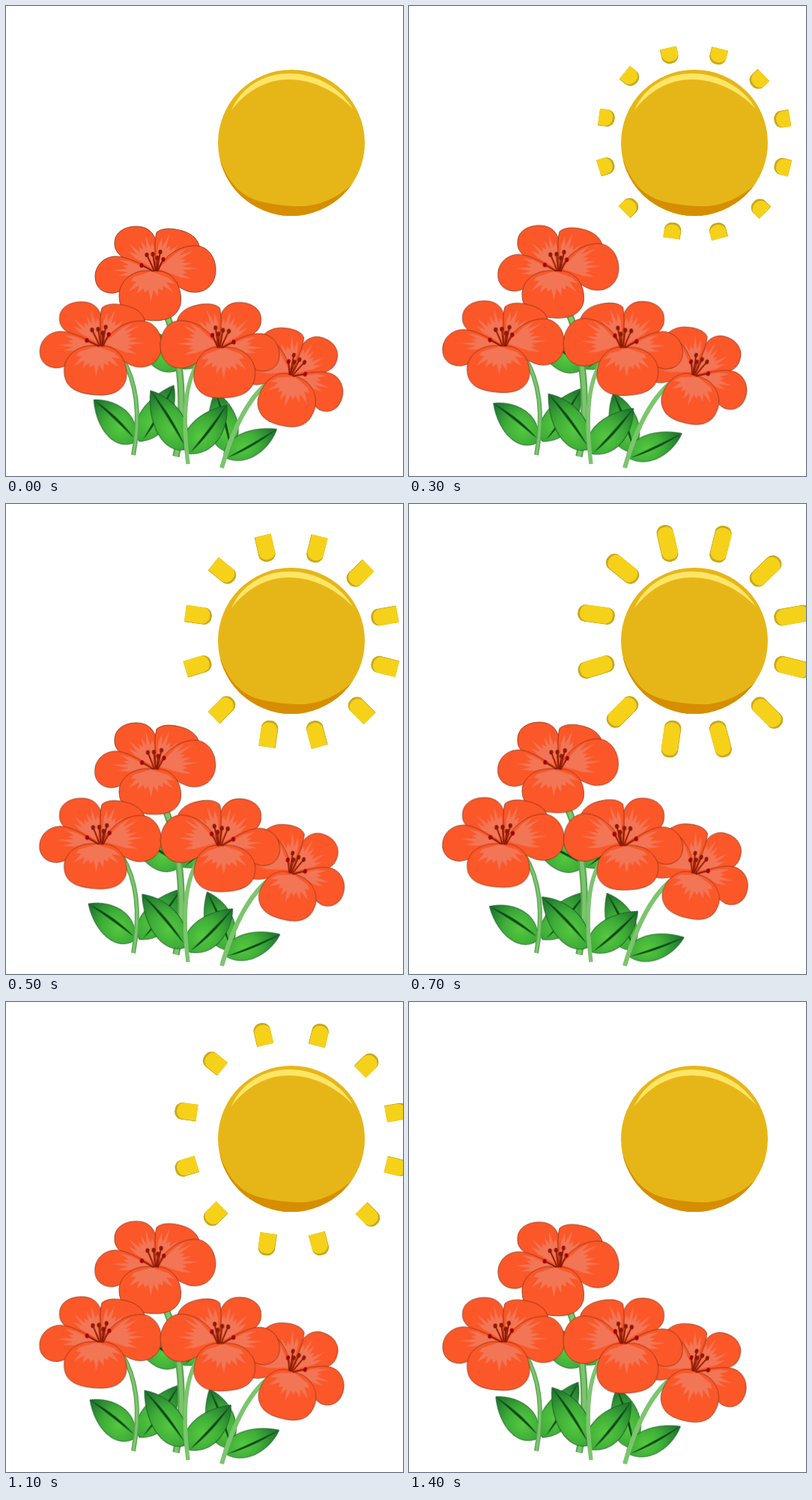
An HTML page that plays this animation: 530x627 px, repeating every 1500 ms.

```html
<!DOCTYPE html>
<html lang="en">
<head>
<meta charset="utf-8">
<title>Flowers in the sun</title>
<style>
html, body { margin: 0; width: 100%; height: 100%; overflow: hidden; background: #fff; }
body { position: relative; }
svg { position: absolute; left: 0; top: 0; display: block; }
.ray {
  position: absolute; width: 50px; height: 23px; margin: -11.5px 0 0 -25px;
  border-radius: 11px; background: #c9a91b;
  animation: shine 1500ms infinite;
}
.ray::before {
  content: ""; position: absolute; inset: .5px 3px; border-radius: 10px; background: #f6d11a;
}
.sway { animation: sway 1500ms infinite; }
.petal { fill: #fc5728; stroke: #86331a; stroke-width: .8; }
.streak { fill: #f27556; }
.stamen { fill: none; stroke: #8c1a04; stroke-width: 1.9; }
.leaf { fill: url(#green); stroke: #14521f; stroke-width: .8; }
.rib { fill: #0e4a18; }
.stem { fill: none; stroke: #58a650; }
.stem + .stem { stroke: #7cc56e; }

/* Every motion advances in 100 ms steps. */
@keyframes sway {
  0% { transform: none; animation-timing-function: steps(7); }
  46.6666% { transform: var(--to); animation-timing-function: steps(8); }
  100% { transform: none; }
}
@keyframes shine {
  0% { clip-path: inset(0 100% 0 0); animation-timing-function: steps(7); }
  46.6666%, 59.9999% { clip-path: inset(0 0 0 0); animation-timing-function: steps(5); }
  93.3333%, 100% { clip-path: inset(0 0 0 100%); }
}
</style>
</head>
<body>
<svg width="530" height="627" viewBox="0 0 530 627">
  <defs>
    <radialGradient id="green" gradientUnits="userSpaceOnUse" cx="0" cy="-28" r="50">
      <stop offset="0" stop-color="#55c93f"/>
      <stop offset=".45" stop-color="#3fae38"/>
      <stop offset="1" stop-color="#1b6f2d"/>
    </radialGradient>
    <clipPath id="disc"><ellipse cx="381" cy="182.5" rx="98" ry="97.5"/></clipPath>
  </defs>
  <g clip-path="url(#disc)">
    <path fill="#e6b618" d="M283 85h196v195h-196z"/>
    <path fill="#d68e00" d="M286 205C298 238 315 256 345 262Q372 268 400 267Q436 263 464 236V282H280V205Z"/>
  </g>
  <path fill="#ffe566" d="M301 139C314 108 344 90 378 90C414 90 447 109 463 137C441 114 410 98 378 98C345 98 320 115 301 139Z"/>
  <g id="plants"></g>
</svg>
<script>
const rad = Math.PI / 180;

// Ray centre and outward angle
const rays = [
  [344.5, 52.5, -103], [416, 53, -76], [476, 89, -44], [512, 148, -10],
  [512, 217, 14], [477.5, 278, 45], [416, 313, 75], [349.5, 313, 98],
  [285, 277, 135], [249.5, 217.5, 163], [249.5, 147.5, 188], [285, 86, 219]
];
for (const [x, y, angle] of rays) {
  const ray = document.createElement('div');
  ray.className = 'ray';
  ray.style.cssText = `left:${x}px;top:${y}px;transform:rotate(${angle}deg)`;
  document.body.append(ray);
}

const sway = (to, inner) => `<g class="sway" style="--to:${to}">${inner}</g>`;

function leaf(x, y, angle, length, width, turn) {
  return `<g transform="translate(${x} ${y})">` + sway(`rotate(${turn}deg)`,
    `<g transform="rotate(${angle}) scale(${width / 40} ${length / 80})">
      <path class="leaf" d="M0 0C-26 -8 -27 -47 0 -80C24 -58 31 -18 0 0Z"/>
      <path class="rib" d="M0 -79Q9 -38 3 -4Q2 -36 0 -79Z"/>
    </g>`) + '</g>';
}

function stem(d, width) {
  return `<path class="stem" stroke-width="${width}" d="${d}"/>
    <path class="stem" stroke-width="${width * .55}" d="${d}"/>`;
}

// Spiky fan of pale streaks between two angles
function streaks(x, y, from, to, count, radius) {
  let d = `M${x} ${y}`;
  for (let i = 0; i <= count * 2; i++) {
    const a = (from + (to - from) * i / (count * 2)) * rad;
    const r = radius * (i % 2 ? 1 - .13 * (i % 3) : .6);
    d += `L${(x + r * Math.cos(a)).toFixed(1)} ${(y + r * Math.sin(a)).toFixed(1)}`;
  }
  return `<path class="streak" d="${d}Z"/>`;
}

const petal = (to, d, ...fan) =>
  sway(to, `<path class="petal" d="${d}"/>` + streaks(...fan));

function stamen(x, y, color) {
  return `<path class="stamen" d="M${2 + x * .2} 0Q${x * .6 + 1} ${y * .55} ${x} ${y}"/>
    <ellipse cx="${x}" cy="${y}" rx="2.6" ry="3.1" fill="${color}"/>`;
}

const blossom =
  petal('scaleY(1.05)', 'M0 0C-18 -8 -55 -16 -53 -38C-53 -52 -40 -60 -24 -60C-4 -60 9 -46 2 -6Z', -2, -4, 210, 274, 6, 46) +
  petal('scaleY(1.05)', 'M2 0C2 -20 -1 -38 3 -52C10 -58 22 -58 34 -55C48 -52 58 -44 60 -34C50 -28 20 -14 2 0Z', 2, -5, 276, 320, 4, 48) +
  petal('rotate(6.5deg)', 'M0 0C-24 -14 -42 -21 -54 -20C-70 -18 -79 -6 -79 7C-79 22 -68 30 -54 29C-44 27 -30 18 0 8Z', -4, -1, 167, 203, 4, 52) +
  petal('rotate(-7deg)', 'M2 0C14 -22 36 -36 58 -34C74 -32 82 -16 82 -2C82 16 70 28 54 28C42 28 36 22 28 18C20 13 10 10 0 8Z', 5, -4, -40, 22, 7, 54) +
  petal('scaleY(.88)', 'M-8 -1C-30 -2 -47 14 -47 32C-47 50 -38 62 -10 65C14 68 30 62 35 44C38 24 28 4 10 0Q2 -2 -8 -1Z', -4, 0, 20, 162, 9, 41) +
  sway('rotate(5deg)',
    stamen(-17, -8, '#a30505') + stamen(-10, -22, '#8c1a04') + stamen(-2, -23, '#8c1a04') +
    stamen(4, -18, '#8c1a04') + stamen(8, -26, '#8c1a04') + stamen(12, -16, '#a30505'));

const flower = (x, y, angle, sx, sy) =>
  `<g transform="translate(${x} ${y}) rotate(${angle}) scale(${sx} ${sy})">${blossom}</g>`;

document.getElementById('plants').innerHTML = [
  leaf(232, 484, -50, 78, 40, -11),
  leaf(234, 484, 40, 78, 36, 11),
  leaf(178, 581, 31.5, 88, 38, 11.5),
  leaf(298, 595, -13, 83, 38, -11),
  stem('M205 392C232 440 242 530 227 601', 9.5),
  leaf(172, 582, -44, 79, 40, -11),
  leaf(238, 592, -29.7, 91, 40, -12),
  leaf(241, 597, 39.7, 84, 40, 10.5),
  leaf(291, 602, 62, 80, 34, 10.6),
  stem('M154 468C174 500 180 545 170 599', 6),
  stem('M257 475C237 505 236 555 243 611', 5.5),
  stem('M354 499C322 522 302 568 288 616', 6),
  flower(198, 354, 0, 1, 1),
  flower(382, 493.5, 20, -.92, 1.03),
  flower(125, 454, 0, 1.01, .99),
  flower(287, 456, 1.5, -.99, 1.02)
].join('');
</script>
</body>
</html>
```
